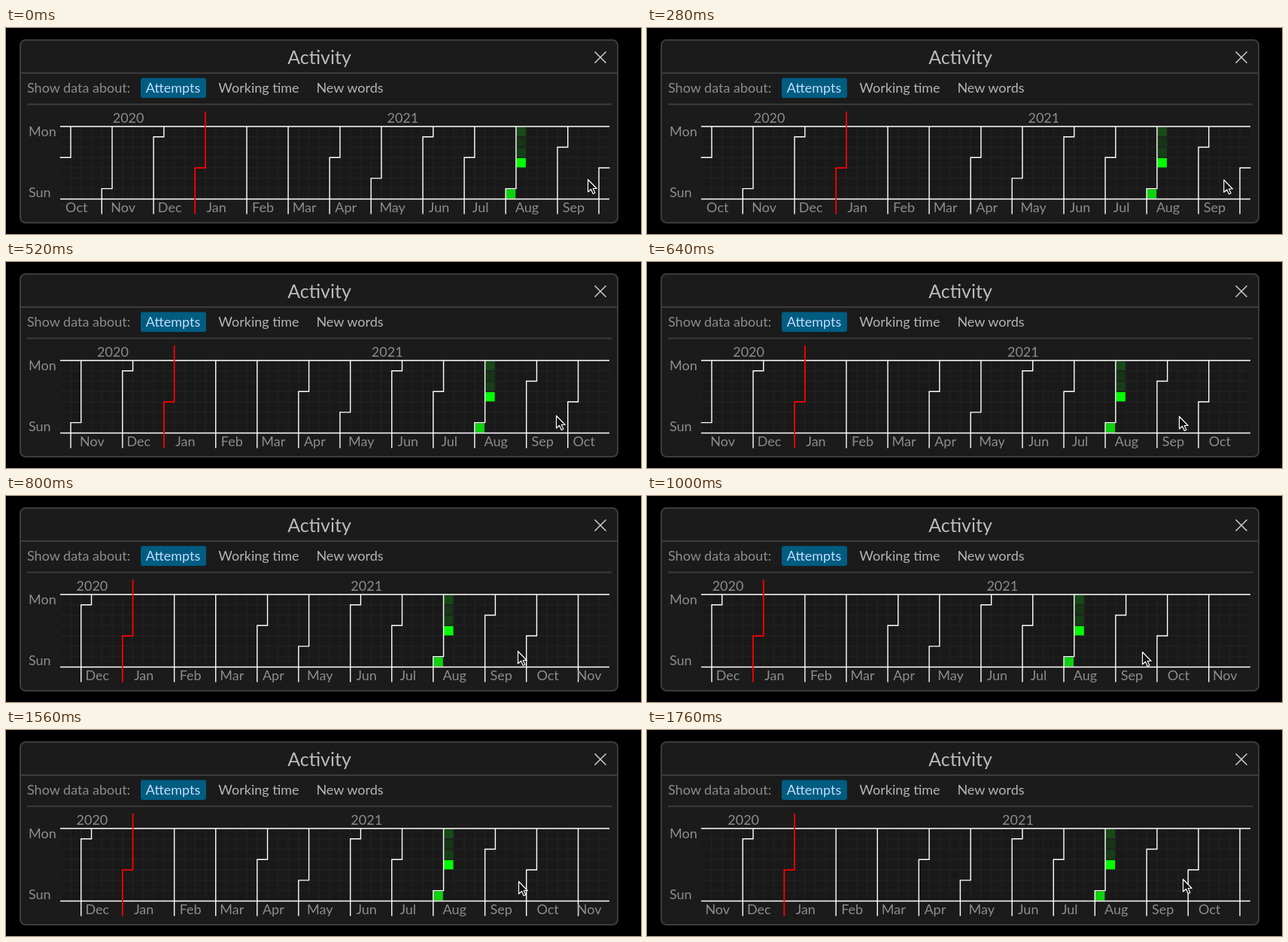
An HTML page that plays this animation: 844 by 274 pixels, repeating every 1.8 s.

```html
<!DOCTYPE html>
<html lang="en">
<head>
<meta charset="utf-8">
<title>Activity</title>
<style>
  html, body { margin: 0; width: 100%; height: 100%; overflow: hidden; background: #000; }
  svg { display: block; width: 844px; height: 274px; }
  text { font: 18px Lato, "Open Sans", sans-serif; fill: #8c8c8c; }
  .mid { text-anchor: middle; }
  .tab { fill: #b4b4b4; text-anchor: middle; }
  .line { fill: none; stroke: #fff; stroke-width: 1.4; }
</style>
</head>
<body>
<svg viewBox="0 0 844 274">
  <rect width="844" height="274" fill="#000"/>
  <rect x="19" y="16" width="794" height="243" rx="7" fill="#1b1b1b" stroke="#3c3c3c" stroke-width="2"/>
  <path d="M20 60H812M28 101.5H805" stroke="#3c3c3c" stroke-width="2"/>
  <text x="416.5" y="48" class="mid" style="font-size:25px;fill:#bbb">Activity</text>
  <path d="M782.5 31.5l15 15m0-15l-15 15" stroke="#ccc" stroke-width="1.5"/>
  <text x="28" y="86">Show data about:</text>
  <rect x="179" y="66.5" width="87" height="26.5" rx="3" fill="#005c80"/>
  <text x="222" y="86" class="tab" style="fill:#c0deff">Attempts</text>
  <text x="336" y="86" class="tab">Working time</text>
  <text x="457" y="86" class="tab">New words</text>
  <text x="30" y="144">Mon</text>
  <text x="30" y="225">Sun</text>
  <rect x="72.2" y="131" width="729.6" height="96.5" fill="#1f1f1f"/>
  <path id="cells" fill="#191919"/>
  <g id="done"></g>
  <path class="line" d="M72 131H802M72 227.5H802"/>
  <path id="months" class="line"/>
  <path id="newYear" fill="none" stroke="#f00" stroke-width="1.8"/>
  <g id="labels"></g>
  <path id="cursor" d="M0 0V16.5L4 13L6.8 19L9.4 17.8L6.7 12H11.6Z" fill="#111" stroke="#fff" stroke-width="1.2" stroke-linejoin="round"/>
</svg>
<script>
const LOOP = 1800, TICK = 40;
const LEFT = 72.25, TOP = 131, PITCH = 13.765, COLS = 53;
const GRAB_X = 774;
const NAMES = ["Jan", "Feb", "Mar", "Apr", "May", "Jun", "Jul", "Aug", "Sep", "Oct", "Nov", "Dec"];
const $ = id => document.getElementById(id);
const colX = c => LEFT + c * PITCH;
const rowY = r => TOP + r * PITCH;

function add(parent, tag, attrs) {
  const el = document.createElementNS("http://www.w3.org/2000/svg", tag);
  for (const k in attrs) el.setAttribute(k, attrs[k]);
  return parent.appendChild(el);
}

// Week column and weekday row of a date, counted from the first Monday
const place = (y, m, d) => {
  const days = Math.round((Date.UTC(y, m, d) - Date.UTC(2020, 8, 28)) / 864e5);
  return { col: Math.floor(days / 7), row: days % 7 };
};

const label = (name, y, from, to) =>
  ({ from, to, el: Object.assign(add($("labels"), "text", { y, class: "mid" }), { textContent: name }) });

const months = [], labels = [];
for (let i = 9; i < 24; i++) {
  const at = place(2020, i, 1);
  months.push({ ...at, red: i === 12 });
  labels.push(label(NAMES[i % 12], 245, at.col, place(2020, i + 1, 1).col));
}
labels.push(label("2020", 126, -40, 14), label("2021", 126, 14, 66));

let grid = "";
for (let c = 0; c < COLS; c++)
  for (let r = 0; r < 7; r++)
    grid += `M${colX(c) + 1} ${rowY(r) + 1}h11.8v11.8h-11.8z`;
$("cells").setAttribute("d", grid);

["#0fd20f", "#174a17", "#173417", "#173f17", "#00ff00"].forEach((fill, i) => {
  const { col, row } = place(2021, 7, 1 + i);
  add($("done"), "rect", { x: colX(col) + .6, y: rowY(row) + .8, width: 12.4, height: 12.3, fill });
});

// Pointer path: time, x, y
const PATH = [
  [0, 773, 201], [200, 773, 201], [240, 772, 201], [400, 749, 203], [520, 731, 204],
  [760, 683, 206], [800, 680, 206], [1000, 658, 207], [1320, 658, 207],
  [1360, 660, 206], [1560, 681, 201], [1760, 712, 198]
];

function pointer(t) {
  const i = PATH.findIndex(p => p[0] > t);
  if (i < 0) return PATH[PATH.length - 1].slice(1);
  const a = PATH[i - 1], b = PATH[i], k = (t - a[0]) / (b[0] - a[0]);
  return [a[1] + (b[1] - a[1]) * k, a[2] + (b[2] - a[2]) * k];
}

// Stepped border before the first day of a month
function border({ col, row, red }, shift) {
  const c = col - shift, x = colX(c), next = colX(c + 1), y = rowY(row);
  const top = red ? 111 : TOP;
  const inside = n => n > 0 && n < COLS;
  if (!row) return inside(c) ? `M${x} ${top}V247.5` : "";
  let d = "";
  if (inside(c + 1)) d += `M${next} ${top}V${y}`;
  if (c >= 0 && c < COLS) d += `M${next + .6} ${y}H${x - .6}`;
  if (inside(c)) d += `M${x} ${y}V247.5`;
  return d;
}

function draw(time) {
  const t = Math.floor((time % LOOP) / TICK) * TICK;
  const [px, py] = pointer(t);
  $("cursor").setAttribute("transform", `translate(${px + .5} ${py + .5})`);

  // The calendar snaps to whole weeks, one tick behind the pointer
  const shift = Math.round((GRAB_X - pointer(Math.max(0, t - TICK))[0]) / PITCH);
  $("done").setAttribute("transform", `translate(${-shift * PITCH} 0)`);
  const path = red => months.filter(m => m.red === red).map(m => border(m, shift)).join("");
  $("months").setAttribute("d", path(false));
  $("newYear").setAttribute("d", path(true));

  for (const { from, to, el } of labels) {
    const a = Math.max(0, from - shift), b = Math.min(COLS, to - shift);
    el.setAttribute("visibility", b - a >= 3 ? "visible" : "hidden");
    el.setAttribute("x", colX((a + b) / 2) - 6);
  }
}

const start = performance.now();
function frame() {
  draw(performance.now() - start);
  requestAnimationFrame(frame);
}
draw(0);
requestAnimationFrame(frame);
</script>
</body>
</html>
```
